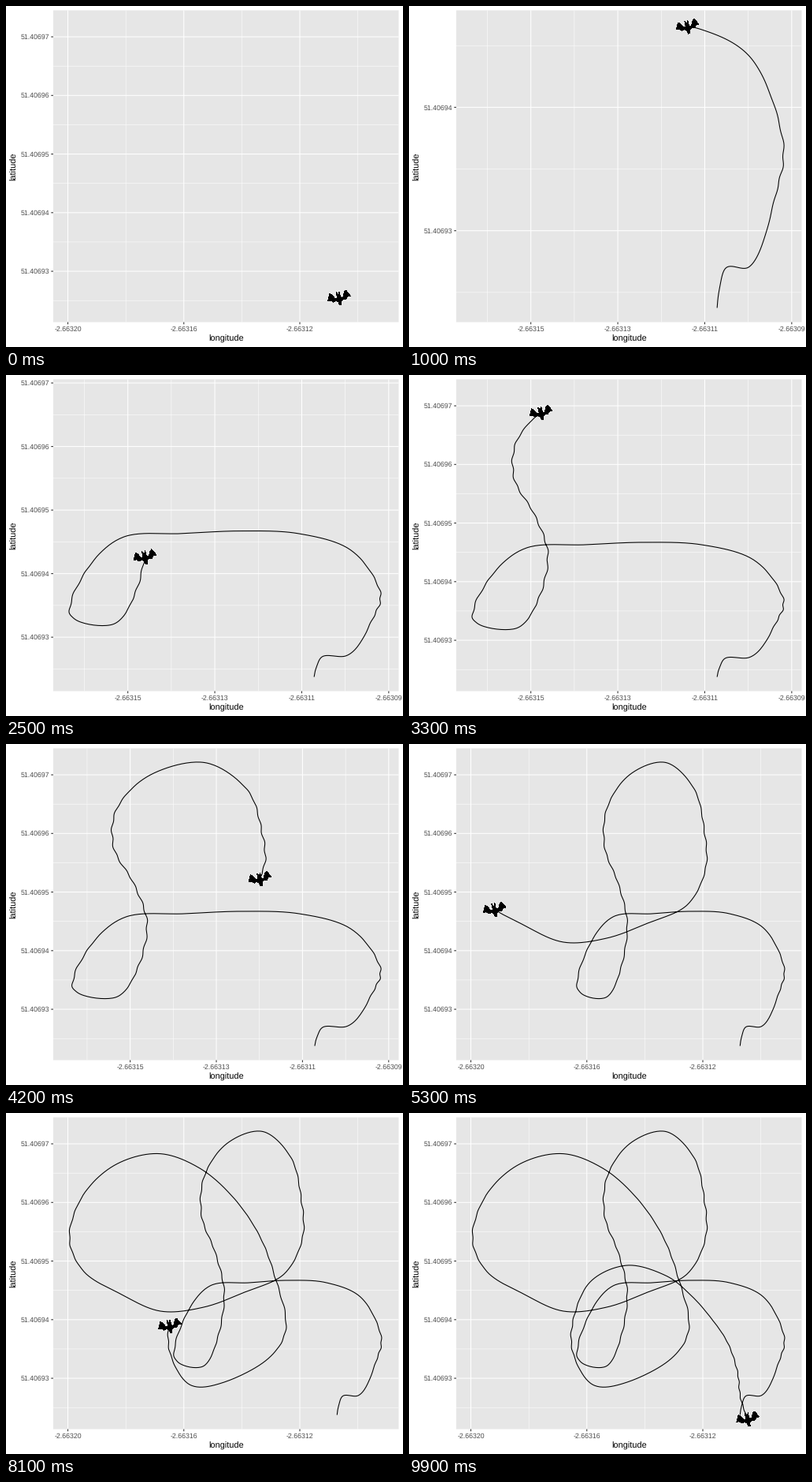
Animation, 504 px wide and 432 px high, one loop 10 s. Source, as a matplotlib script:

```python
import numpy as np
import matplotlib.pyplot as plt
from matplotlib.animation import FuncAnimation
from matplotlib.patches import Polygon, Rectangle

plt.rcParams["font.family"] = "Liberation Sans"
plt.rcParams["text.hinting"] = "none"

FRAMES, INTERVAL = 100, 100
W, H = 504, 432
LEFT, RIGHT, TOP, BOTTOM = 60, 498.5, 5.5, 400.5
PAD_X, PAD_Y = (RIGHT - LEFT) / 22, (BOTTOM - TOP) / 22
X0, X1 = LEFT + PAD_X, RIGHT - PAD_X      # pixels of the data limits
Y0, Y1 = BOTTOM - PAD_Y, TOP + PAD_Y

# Data units are 1e-5 degrees, counted from -2.663 and 51.406
EAST, SOUTH = -9.132, 92.374
WEST_NEAR, WEST_FAR = -16.354, -19.962
NORTH_NEAR, NORTH_FAR = 94.671, 97.210

# Way points in pixels of the widest view: take-off, then one every two frames
WAY = np.array([
    (420, 382.5), (427, 359),
    (447, 358), (470, 314), (475.5, 280), (451, 234), (407, 215), (358, 212),
    (309, 215), (259, 219), (228, 257), (214, 310), (250, 321), (269, 284),
    (277, 228), (266, 178), (248.5, 131), (251.5, 81), (280, 39), (326, 23.5),
    (362, 57), (374.5, 107), (376.5, 158), (353, 204), (303, 227), (251, 246),
    (196, 251), (145, 229), (99, 201), (80.5, 157), (98, 104), (139, 65.5),
    (194, 51.5), (246, 70), (288.5, 107), (321, 154), (341, 206),
    (355.5, 270), (333, 311), (277, 341), (233, 344), (208, 303),
    (209.5, 258), (231, 213), (277, 193), (326, 206), (358, 231),
    (384, 260.5), (405, 292), (417, 328), (421, 361), (433, 396)])
WAY_TIME = np.r_[-0.5, 0.5, 1.5 + 2 * np.arange(len(WAY) - 2)]
WAY_SPEED = np.gradient(WAY, WAY_TIME, axis=0)

# Right half of the bat, from the head down; the left half mirrors it
HALF = np.array([(0, -3), (2, -7), (2, 0), (5, 1), (8, -5), (10.5, -7),
                 (14.5, 1), (11, 1), (8, 4), (5, 3), (2, 5), (1, 9.5)])
TILT = np.radians(13)


def bat_shape():
    x, y = np.vstack([HALF, HALF[::-1] * (-1, 1)]).T
    c, s = np.cos(TILT), np.sin(TILT)
    return np.column_stack([x * c + y * s, y * c - x * s])


def flight(t):
    """Position at time t: a Hermite curve with a flutter on steep parts."""
    t = np.atleast_1d(t)
    i = np.clip(np.searchsorted(WAY_TIME, t, "right") - 1, 0, len(WAY) - 2)
    h = (WAY_TIME[i + 1] - WAY_TIME[i])[:, None]
    u = (t - WAY_TIME[i])[:, None] / h
    bend = 3 * u**2 - 2 * u**3
    p = (WAY[i] * (1 - bend) + WAY[i + 1] * bend
         + h * u * (1 - u) * ((1 - u) * WAY_SPEED[i] - u * WAY_SPEED[i + 1]))
    v = WAY_SPEED[i] * (1 - u) + WAY_SPEED[i + 1] * u
    steep = v[:, 1]**2 / (v**2).sum(axis=1)
    p[:, 0] += 0.7 * steep**4 * np.sin(2 * np.pi * t / 0.85)
    lon = EAST - (X1 - p[:, 0]) * (EAST - WEST_FAR) / (X1 - X0)
    lat = SOUTH + (Y0 - p[:, 1]) * (NORTH_FAR - SOUTH) / (Y0 - Y1)
    return lon, lat


def ease(frame, start, length=6):
    t = np.clip((frame - start) / length, 0, 1)
    return 4 * t**3 if t < 0.5 else 1 - 4 * (1 - t)**3


def mix(a, b, t):
    return a + (b - a) * t


def view(frame):
    """West and north limits: zoom in, then widen north, then west."""
    zoom = 1 - ease(frame, 1)
    west = mix(WEST_NEAR, WEST_FAR, zoom + ease(frame, 41))
    north = mix(NORTH_NEAR, NORTH_FAR, zoom + ease(frame, 21))
    return west, north


fig = plt.figure(figsize=(W / 72, H / 72), dpi=72, facecolor="white")
ax = fig.add_axes([0, 0, 1, 1])
ax.set(xlim=(0, W), ylim=(H, 0))
ax.axis("off")
panel = Rectangle((LEFT, TOP), RIGHT - LEFT, BOTTOM - TOP, fc="#e6e6e6",
                  lw=0, snap=False)
ax.add_patch(panel)
ax.text((LEFT + RIGHT) / 2, 425, "longitude", size=11, ha="center",
        va="baseline")
ax.text(13.5, (TOP + BOTTOM) / 2, "latitude", size=11, rotation=90,
        rotation_mode="anchor", ha="center", va="baseline")

BAT = bat_shape()
path, = ax.plot([], [], color="black", lw=1.07, zorder=4,
                solid_joinstyle="round", solid_capstyle="butt")
bat = Polygon(BAT, closed=True, fc="black", lw=0, antialiased=False, zorder=5)
ax.add_patch(bat)
for artist in (path, bat):
    artist.set_clip_path(panel)
live = []


def rule(xs, ys, color, width, z):
    live.extend(ax.plot(xs, ys, color=color, lw=width, zorder=z, snap=False,
                        solid_capstyle="butt"))


def label(x, y, text, ha):
    live.append(ax.text(x, y, text, size=8.8, color="#4d4d4d", ha=ha,
                        va="baseline"))


def breaks(step, to_px, lo, hi, offset=0):
    """Yield value, pixel and whether it is a major break."""
    for k in range(-60, 240):
        value = offset + k * step / 2
        px = to_px(value)
        if lo < px < hi:
            yield value, px, k % 2 == 0


def draw(frame):
    while live:
        live.pop().remove()
    west, north = view(frame)

    def px_x(v):
        return X1 - (EAST - v) * (X1 - X0) / (EAST - west)

    def px_y(v):
        return Y0 - (v - SOUTH) * (Y0 - Y1) / (north - SOUTH)

    near = EAST - west < 8.3
    step, offset = (2, -15) if near else (4, -16)
    for v, x, major in breaks(step, px_x, LEFT, RIGHT, offset):
        rule([x, x], [TOP, BOTTOM], "white", 1.07 if major else 0.53,
             2 + major)
        if major:
            rule([x, x], [BOTTOM, BOTTOM + 2.75], "#333333", 1.07, 3)
            label(x, 411.7, f"{-2.663 + v * 1e-5:.5f}", "center")
    for v, y, major in breaks(1, px_y, TOP, BOTTOM):
        rule([LEFT, RIGHT], [y, y], "white", 1.07 if major else 0.53,
             2 + major)
        if major:
            rule([LEFT - 2.75, LEFT], [y, y], "#333333", 1.07, 3)
            label(54.9, y + 3.1, f"{51.406 + v * 1e-5:.5f}", "right")

    lon, lat = flight(np.linspace(-0.5, frame, 12 * frame + 7))
    xs, ys = px_x(lon), px_y(lat)
    path.set_data(xs, ys)
    path.set_visible(frame > 0)
    bat.set_xy(BAT + (xs[-1], ys[-1]))
    return []


anim = FuncAnimation(fig, draw, frames=FRAMES, interval=INTERVAL,
                     init_func=lambda: [], repeat=True, repeat_delay=0)
plt.show()
```
